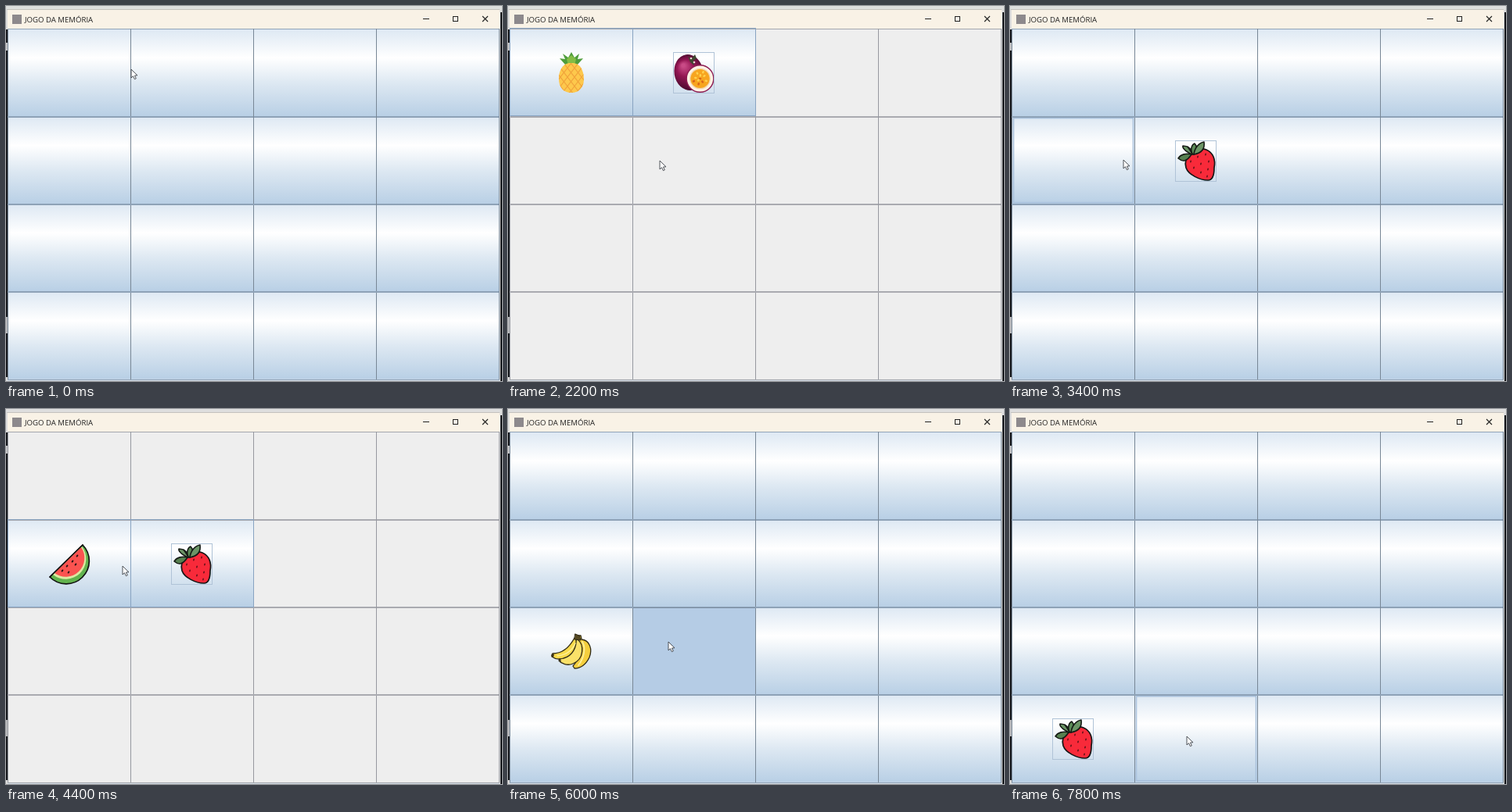
Write an HTML page with a canvas that moves like this. It is 634 by 480 pixels and loops after 8000 ms.

```html
<!DOCTYPE html>
<html lang="pt">
<head>
<meta charset="utf-8">
<title>Jogo da memória</title>
<style>
html, body { margin: 0; width: 100%; height: 100%; overflow: hidden; background: #dedede; }
canvas { display: block; }
</style>
</head>
<body>
<canvas id="stage" width="634" height="480"></canvas>
<script>
const ctx = document.getElementById('stage').getContext('2d');
const LOOP = 8000, STEP = 200;
const LEFT = 3, TOP = 29.4, CELL_W = 157, CELL_H = 112.1;

function rect(x, y, w, h, color) {
  ctx.fillStyle = color;
  ctx.fillRect(x, y, w, h);
}

function frame(x, y, w, h, color) {
  ctx.strokeStyle = color;
  ctx.lineWidth = 1;
  ctx.strokeRect(x + 0.5, y + 0.5, w, h);
}

function shape(path, fill, stroke, width = 1.6) {
  const p = typeof path === 'string' ? new Path2D(path) : path;
  if (fill) { ctx.fillStyle = fill; ctx.fill(p); }
  if (stroke) { ctx.strokeStyle = stroke; ctx.lineWidth = width; ctx.stroke(p); }
}

function oval(x, y, rx, ry = rx, angle = 0) {
  const p = new Path2D();
  p.ellipse(x, y, rx, ry, angle, 0, Math.PI * 2);
  return p;
}

function dots(points, rx, ry, angle, color) {
  for (const [x, y] of points) shape(oval(x, y, rx, ry, angle), color);
}

// Each fruit is drawn in a 52 x 52 box.
const fruits = {
  pineapple() {
    shape('M20 17L12 8L19 9L16 2L23 7L27 0L31 7L37 2L35 9L42 8L34 17Z', '#4f9d3c');
    shape('M23 17L21 9L27 4L33 9L31 17Z', '#83bd45');
    const body = new Path2D('M27 14C38 13 43 24 43 34C43 45 37 52 27 52C17 52 11 45 11 34C11 24 16 13 27 14Z');
    shape(body, '#fdc84c');
    ctx.save();
    ctx.clip(body);
    for (let k = -40; k < 90; k += 9) {
      shape(`M${k} 10L${k + 34} 54M${k + 34} 10L${k} 54`, null, '#f1a43b', 1.2);
    }
    ctx.restore();
  },
  passion() {
    const skin = ctx.createRadialGradient(13, 17, 2, 20, 26, 24);
    skin.addColorStop(0, '#c94a86');
    skin.addColorStop(0.4, '#941653');
    skin.addColorStop(1, '#460a2b');
    shape(oval(20, 26, 18.5, 23, -0.15), skin);
    shape('M19 5L23 9L28 3L30 8L26 11L27 17L22 13Z', '#3f4730');
    dots([[23, 8], [27, 13]], 1.3, 1.3, 0, '#e8d8d2');
    shape(oval(34.5, 34, 17.3), '#fff2e5', '#8d1d53', 1.4);
    shape(oval(34.5, 34, 12.7), '#f7a51f', '#f2d4a7', 1.2);
    for (let i = 0; i < 11; i++) {
      const a = i * 2.4, r = 2.9 * Math.sqrt(i);
      shape(oval(34.5 + r * Math.cos(a), 34 + r * Math.sin(a), 1.8, 1.3, a),
        i % 3 ? '#ffd24e' : '#d9651a');
    }
  },
  strawberry() {
    shape('M20 17C26 12 33 9 40 12C49 16 52 25 50 35C50 43 49 51 42 51C32 51 17 44 14 35C12 28 14 22 20 17Z', '#f82a3a', '#151515', 1.7);
    shape('M21 18C14 16 7 18 4 23C10 28 15 27 21 18Z', '#568050', '#151a15');
    shape('M21 18C12 13 9 10 10 7C17 7 21 11 23 17Z', '#6b9566', '#151a15');
    shape('M22 18C19 10 22 5 25 4C29 8 28 13 24 18Z', '#5b8a57', '#151a15');
    shape('M24 18C25 9 31 3 37 2C38 9 36 16 24 18Z', '#6b9566', '#151a15');
    shape('M22 17L16 8', null, '#151a15', 1.5);
    dots([[20, 27], [29, 21], [39, 18], [24, 35], [33, 30], [43, 27], [33, 41], [42, 37], [41, 46]],
      0.9, 1.5, 0.3, '#6b141b');
  },
  watermelon() {
    shape('M2 43L44 2A29.3 29.3 0 0 1 2 43Z', '#62b34e', '#111', 1.7);
    shape('M6 40L43 4A26 26 0 0 1 6 40Z', '#dce9a2');
    shape('M8 38L42 5A24 24 0 0 1 8 38Z', '#fa5350');
    shape('M2 43L44 2', null, '#111', 1.6);
    dots([[37, 16], [31, 23], [24, 29], [18, 35], [35, 27], [26, 37]], 1.1, 1.7, 0.6, '#291515');
  },
  banana() {
    const edge = '#2f2a16';
    shape('M33 6L39 6L40 11C51 12 54 24 50 34C46 42 40 48 31 48L29 45C36 38 38 26 35 12Z', '#f5cf3e', edge, 1.3);
    shape('M35 11C43 17 44 36 29 42C22 45 14 42 11 38L13 35C23 35 30 27 33 11Z', '#fae169', edge, 1.3);
    shape('M33 10C34 20 29 32 17 35C11 37 6 36 2 33L3 29C14 29 24 22 31 9Z', '#f8da4c', edge, 1.3);
    shape('M41 14C46 22 43 35 36 44', null, '#fff09b', 1.8);
    shape('M32 16C28 25 20 31 9 32', null, '#fff09b', 1.5);
    shape('M32 4L37 6L39 12L31 11Z', '#554821', edge, 1);
    shape('M2 29L5 30L4 34L1 32ZM10 36L13 35L14 40Z', '#3a3219');
  },
  apple() {
    shape('M27 15C35 8 50 12 50 28C50 41 42 52 35 51C30 50 25 50 20 51C12 52 4 40 4 28C4 13 18 8 27 15Z', '#ff5630', '#111', 2);
    shape('M8 24C8 18 12 15 17 14', null, '#ffc1ae', 2);
    shape('M27 15C26 9 27 5 30 2', null, '#111', 2);
    shape('M26 13C17 13 14 8 15 2C23 1 27 6 26 13Z', '#4c9a4c', '#172a17', 1.4);
  }
};

// Board states: cards are [cell, fruit]; locked greys out every other cell.
const states = [
  { at: 0 },
  { at: 600, pressed: 0 },
  { at: 800, cards: [[0, 'pineapple']], focus: 0 },
  { at: 1400, cards: [[0, 'pineapple']], pressed: 1 },
  { at: 1600, cards: [[0, 'pineapple'], [1, 'passion']], focus: 1, locked: true },
  { at: 2600 },
  { at: 2800, pressed: 5 },
  { at: 3000, cards: [[5, 'strawberry']], focus: 5 },
  { at: 3600, cards: [[5, 'strawberry']], pressed: 4 },
  { at: 3800, cards: [[4, 'watermelon'], [5, 'strawberry']], focus: 5, locked: true },
  { at: 4800 },
  { at: 5400, pressed: 8 },
  { at: 5600, cards: [[8, 'banana']], focus: 8 },
  { at: 6000, cards: [[8, 'banana']], pressed: 9 },
  { at: 6200, cards: [[8, 'banana'], [9, 'apple']], focus: 9, locked: true },
  { at: 7200 },
  { at: 7400, pressed: 12 },
  { at: 7600, cards: [[12, 'strawberry']], focus: 12 }
];

// Pointer path: time, x, y.
const pointer = [
  [0, 160, 81], [400, 112, 86], [800, 108, 88], [1200, 194, 92], [1600, 198, 94],
  [2200, 194, 198], [3000, 196, 201], [3400, 145, 197], [4400, 149, 201],
  [4800, 147, 205], [5400, 120, 268], [5600, 122, 270], [6000, 205, 298],
  [6200, 203, 302], [7000, 137, 370], [7400, 119, 407], [7800, 226, 419]
];

function pointerAt(t) {
  const i = pointer.findIndex(p => p[0] > t);
  if (i < 0) return pointer.at(-1).slice(1);
  const [t0, x0, y0] = pointer[i - 1], [t1, x1, y1] = pointer[i];
  const k = (t - t0) / (t1 - t0), s = k * k * (3 - 2 * k);
  return [x0 + (x1 - x0) * s, y0 + (y1 - y0) * s];
}

const cellX = cell => LEFT + cell % 4 * CELL_W;
const cellY = cell => TOP + Math.floor(cell / 4) * CELL_H;

function hoveredCell(x, y) {
  const col = Math.floor((x - LEFT) / CELL_W), row = Math.floor((y - TOP) / CELL_H);
  const inset = x - LEFT - col * CELL_W;
  return row < 0 || inset < 2 ? -1 : row * 4 + col;
}

function drawWindow() {
  rect(0, 0, 634, 480, '#dedede');
  rect(0, 30, 2, 445, '#17191e');
  rect(0, 47, 2, 10, '#c5c6c8');
  rect(0, 398, 2, 21, '#b9babd');
  rect(632, 8, 2, 472, '#15171b');
  rect(1, 4, 630, 1, '#c3c1bd');
  rect(2, 5, 629, 24, '#f9f2e6');
  rect(2, 478, 629, 2, '#d7dfe7');
  rect(8, 11, 12, 12, '#8d898c');
  ctx.fillStyle = '#222';
  ctx.font = '9.6px "Open Sans", "Noto Sans", sans-serif';
  ctx.fillText('JOGO DA MEMÓRIA', 24, 20.5);
  rect(533, 16, 8, 1, '#222');
  frame(571, 13, 6, 6, '#222');
  shape('M609 13L616 20M616 13L609 20', null, '#222', 1.1);
}

function drawCell(cell, state, hovered) {
  const x = cellX(cell), y = cellY(cell);
  const open = state.cards?.some(card => card[0] === cell);
  if (state.locked && !open) {
    rect(x, y, CELL_W, CELL_H, '#eeeeee');
  } else if (state.pressed === cell) {
    rect(x, y, CELL_W, CELL_H, '#b5cce5');
  } else {
    const g = ctx.createLinearGradient(0, y, 0, y + CELL_H);
    g.addColorStop(0, '#dde8f3');
    g.addColorStop(0.33, '#ffffff');
    g.addColorStop(0.62, '#dde8f2');
    g.addColorStop(1, '#b8cfe5');
    ctx.fillStyle = g;
    ctx.fillRect(x, y, CELL_W, CELL_H);
  }
  if (hovered) {
    ctx.strokeStyle = '#a9c1dc';
    ctx.lineWidth = 1.6;
    ctx.strokeRect(x + 1.5, y + 2, CELL_W - 4, CELL_H - 4);
  }
}

function drawGrid(locked) {
  for (let i = 0; i < 5; i++) {
    rect(i ? LEFT - 1 + i * CELL_W : 2, 29, 1, 449, locked ? '#96989f' : '#788796');
    const y = Math.round(TOP + i * CELL_H);
    if (i > 0 && i < 4) rect(2, y - 1, 629, 2, locked ? '#a9aab0' : '#8ea2b7');
    else rect(2, y, 629, 1, locked ? '#a3a7ae' : '#91a4b8');
  }
}

function drawCard([cell, name], state) {
  const x = Math.round(cellX(cell) + 51), y = Math.round(cellY(cell) + 30);
  if (state.locked) {
    frame(cellX(cell) - 1, Math.round(cellY(cell)) - 1, CELL_W, 112, '#88a3c1');
  }
  ctx.save();
  ctx.translate(x, y);
  ctx.lineJoin = ctx.lineCap = 'round';
  fruits[name]();
  ctx.restore();
  if (state.focus === cell) frame(x, y, 52, 52, '#b0c3d7');
}

function drawPointer(x, y) {
  ctx.save();
  ctx.translate(x, y);
  shape('M0 0L0 11L2.5 8.7L4.4 12.7L6.3 11.8L4.5 8L8 7.8Z', '#fff', '#3c4047', 0.9);
  ctx.restore();
}

function draw(t) {
  const state = states.findLast(s => s.at <= t);
  const [x, y] = pointerAt(t);
  const hover = state.locked || state.pressed !== undefined ? -1 : hoveredCell(x, y);
  drawWindow();
  for (let cell = 0; cell < 16; cell++) drawCell(cell, state, cell === hover);
  drawGrid(state.locked);
  if (state.pressed !== undefined) {
    rect(cellX(state.pressed), Math.round(cellY(state.pressed)), CELL_W - 1, 1, '#7c8fa3');
  }
  state.cards?.forEach(card => drawCard(card, state));
  drawPointer(x, y);
}

function tick() {
  draw(Math.floor(performance.now() % LOOP / STEP) * STEP);
  requestAnimationFrame(tick);
}
tick();
</script>
</body>
</html>
```
